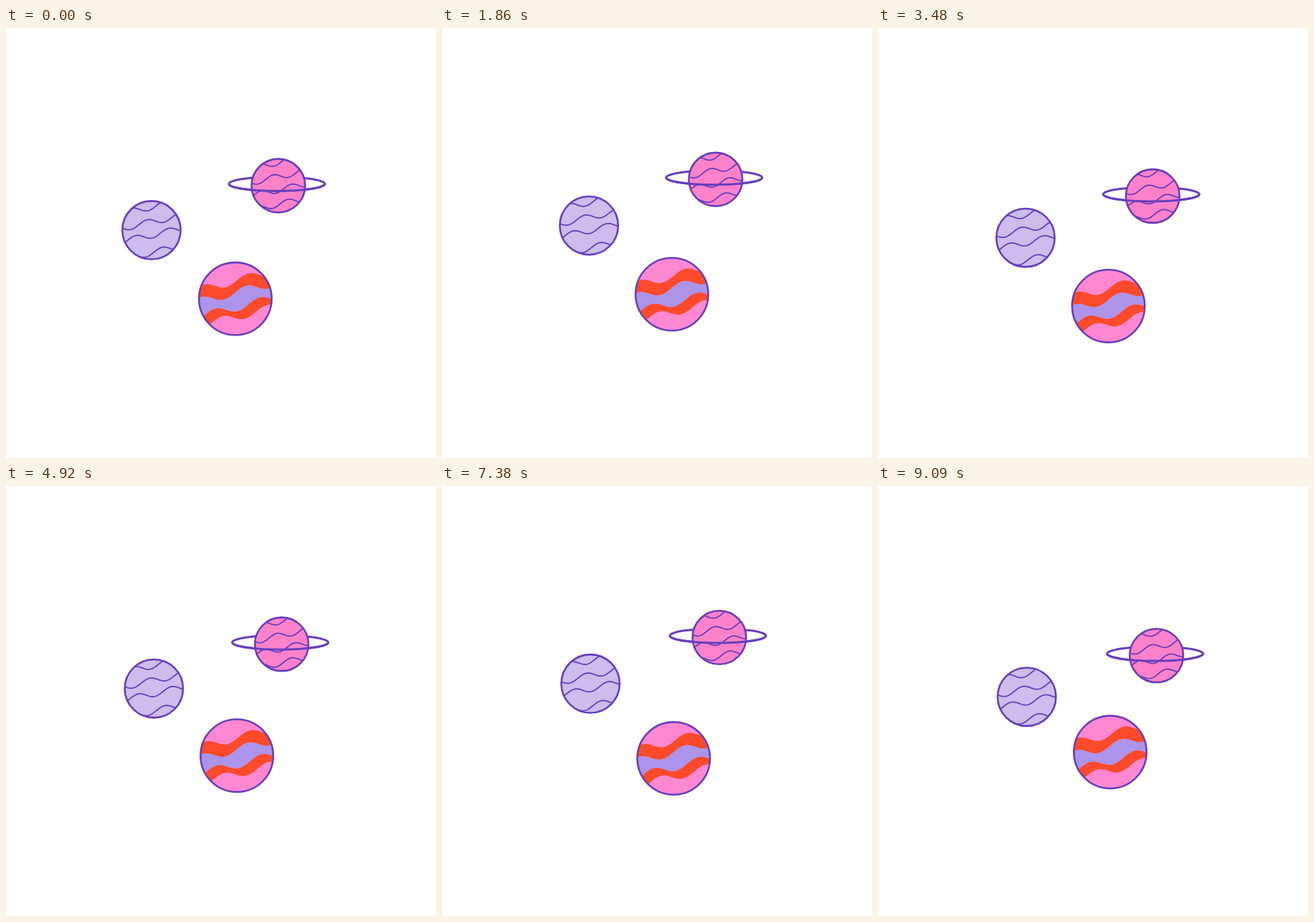
Write an HTML page with a canvas that moves like this. It is 600 px wide and 600 px high and loops after 9.12 s.

```html
<!DOCTYPE html>
<html lang="en">
<head>
<meta charset="utf-8">
<title>Bobbing planets</title>
<style>
html, body { margin: 0; width: 100%; height: 100%; overflow: hidden; background: #fff; }
canvas { display: block; }
</style>
</head>
<body>
<canvas id="stage" width="600" height="600"></canvas>
<script>
const ctx = document.getElementById('stage').getContext('2d');
const STEP = 30, STEPS = 304, TURN = 2 * Math.PI, INK = '#683ebd';

// Shared bobbing tempo: time in ms, cycles done.
const TEMPO = [[0, -.3], [1860, 2.47], [3480, 4.9], [4920, 6.71], [6300, 8.83], [7380, 10.46], [9090, 12.96]];

// drift: pixels moved right over the loop; ease: its exponent; lag: cycles lost by the end.
// Each wave is [height at the centre, x of its lowest bulge].
const lilac = {
  x: 203, drift: 4.6, ease: .5, y: 285, bob: 9.5, lag: 0,
  r: 40.7, fill: '#ccbdec', slope: -.22, amp: 4.3, length: 46,
  waves: [[-32.5, -5], [-11.5, 17], [7, 1], [31.5, -8]]
};
const ringed = {
  x: 380, drift: 8.6, ease: 1, y: 224, bob: 13, lag: 0,
  r: 37.4, fill: '#ff82ca', slope: -.22, amp: 4, length: 42,
  waves: [[-32.5, -6], [-12.5, 14], [6, -3], [26, -8]]
};
const banded = {
  x: 320, drift: 4, ease: 1, y: 380.7, bob: 9.4, lag: .46,
  r: 50.7, fill: '#ff88d1', slope: -.25, amp: 5.7, length: 62,
  waves: [[-25, -13], [-8.5, -16], [12.5, 3], [25.5, 13]]
};

function cycles(t) {
  const i = Math.max(1, TEMPO.findIndex(([time]) => time >= t));
  const [t0, c0] = TEMPO[i - 1], [t1, c1] = TEMPO[i];
  return c0 + (c1 - c0) * (t - t0) / (t1 - t0);
}

function wave(p, [base, bulge]) {
  const pts = [];
  for (let x = -p.r - 2; x <= p.r + 2; x++)
    pts.push([x, base + p.slope * x + p.amp * Math.cos(TURN * (x - bulge) / p.length)]);
  return pts;
}

function trace(pts) {
  ctx.beginPath();
  for (const pt of pts) ctx.lineTo(...pt);
}

function lines(waves) {
  ctx.lineWidth = 1.8;
  for (const pts of waves) {
    trace(pts);
    ctx.stroke();
  }
}

function bands(waves) {
  ['#ff4a2b', '#ab94e9', '#ff4a2b'].forEach((color, i) => {
    trace([...waves[i], ...waves[i + 1].reverse()]);
    waves[i + 1].reverse();
    ctx.fillStyle = color;
    ctx.fill();
  });
}

function ring(end) {
  ctx.beginPath();
  ctx.ellipse(-2, -2.5, 67, 10, 0, 0, end);
  ctx.lineWidth = 3;
  ctx.stroke();
}

function planet(p, t, paint) {
  const s = t / (STEP * (STEPS - 1));
  const phase = cycles(t) - p.lag * s ** 4;
  ctx.save();
  ctx.translate(p.x + p.drift * s ** p.ease, p.y + p.bob * Math.cos(TURN * phase));
  ctx.strokeStyle = INK;
  if (p === ringed) ring(TURN);
  const disc = new Path2D();
  disc.arc(0, 0, p.r, 0, TURN);
  ctx.fillStyle = p.fill;
  ctx.fill(disc);
  ctx.save();
  ctx.clip(disc);
  paint(p.waves.map(w => wave(p, w)));
  ctx.restore();
  ctx.lineWidth = 2.6;
  ctx.stroke(disc);
  if (p === ringed) ring(TURN / 2);
  ctx.restore();
}

function draw(now) {
  const t = Math.floor(now / STEP) % STEPS * STEP;
  ctx.clearRect(0, 0, 600, 600);
  planet(lilac, t, lines);
  planet(ringed, t, lines);
  planet(banded, t, bands);
  requestAnimationFrame(draw);
}
draw(0);
</script>
</body>
</html>
```
